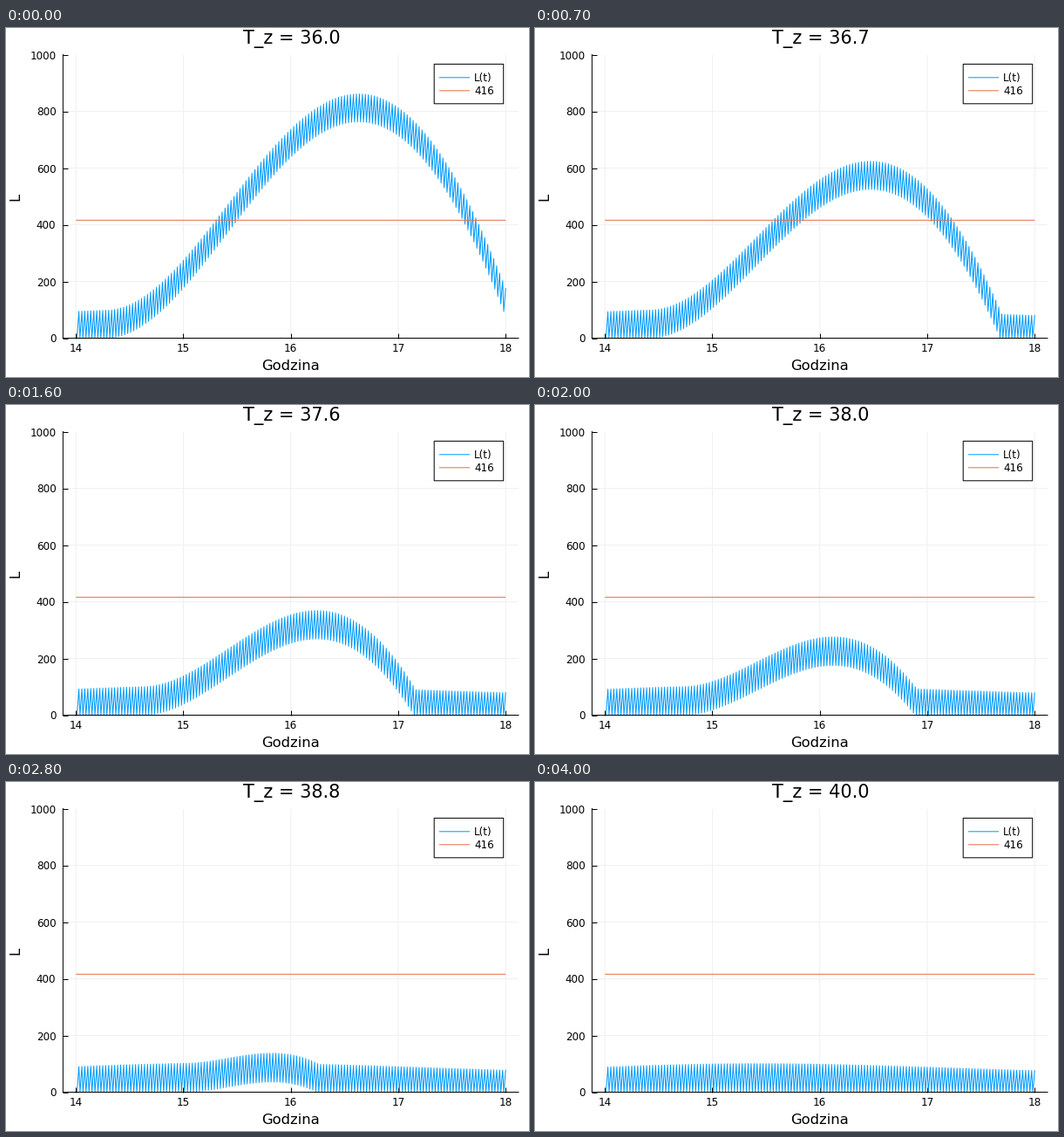
A matplotlib script that plays this animation: 600x400 px, repeating every 4.1 s.

```python
import numpy as np
import matplotlib.pyplot as plt
from matplotlib.animation import FuncAnimation
from matplotlib.patches import Rectangle

W, H, DPI = 600, 400, 100
BLUE, ORANGE = "#009afa", "#e36f47"
CYCLE, HOURS = 100, 4      # light cycle in seconds, length of the simulation
OUTFLOW = 4.2826           # cars per second leaving on green
LIMIT = 416


def pt(px):
    return px * 72 / DPI


def inflow(t):
    """Cars per second arriving at hour t, a slightly skewed rush-hour bell."""
    return 1.015 + 0.665 * np.exp(-40 * np.log(t / 15.41) ** 2)


def queue(green):
    """Queue length at every change of the lights."""
    ts, ls = [14.0], [0.0]
    level = 0.0
    for k in range(HOURS * 3600 // CYCLE):
        start = 14 + k * CYCLE / 3600
        rate = inflow(start + CYCLE / 7200)
        level = max(0.0, level - (OUTFLOW - rate) * green)
        ts.append(start + green / 3600)
        ls.append(level)
        level += rate * (CYCLE - green)
        ts.append(start + CYCLE / 3600)
        ls.append(level)
    return ts, ls


plt.rcParams["font.family"] = "DejaVu Sans"
fig = plt.figure(figsize=(W / DPI, H / DPI), dpi=DPI, facecolor="white")
left, right, top, bottom = 65.4, 588.0, 30.5, 355.5
ax = fig.add_axes([left / W, 1 - bottom / H, (right - left) / W, (bottom - top) / H])
ax.set_xlim(13.88, 18.12)
ax.set_ylim(0, 1000)
ax.set_xticks(range(14, 19))
ax.set_yticks(range(0, 1001, 200))
ax.tick_params(direction="in", length=pt(6), width=pt(1), labelsize=pt(12), pad=pt(5.5))
ax.tick_params(axis="y", pad=pt(8))
ax.grid(color="#f0f0f0", linewidth=pt(1), snap=False)
ax.set_axisbelow(True)
for side in ("top", "right"):
    ax.spines[side].set_visible(False)
for side in ("left", "bottom"):
    ax.spines[side].set_linewidth(pt(1))
    ax.spines[side].set_snap(False)
for tick in ax.xaxis.get_ticklines() + ax.yaxis.get_ticklines():
    tick.set_snap(False)


def label(x, y, text, size, **kw):
    return fig.text(x / W, 1 - y / H, text, fontsize=pt(size), **kw)


title = label(327.5, 18.4, "", 20.9, ha="center", va="baseline")
label(327, 392, "Godzina", 16.4, ha="center", va="baseline")
label(18.7, 193.5, "L", 16.4, ha="right", va="center", rotation=90)

curve, = ax.plot([], [], color=BLUE, lw=pt(1), solid_joinstyle="round")
ax.plot([14, 18], [LIMIT, LIMIT], color=ORANGE, lw=pt(1), snap=False,
        solid_capstyle="butt")

# legend
fig.add_artist(Rectangle((491.2 / W, 1 - 86.8 / H), 79.5 / W, 45.4 / H,
                         fc="white", ec="black", lw=pt(1), snap=False, zorder=5))
for y, color, text in ((56.8, BLUE, "L(t)"), (71.8, ORANGE, str(LIMIT))):
    fig.add_artist(plt.Line2D([497 / W, 532 / W], [1 - y / H] * 2, color=color,
                              lw=pt(1), snap=False, zorder=6, solid_capstyle="butt"))
    label(537, y + 4.6, text, 12, va="baseline", zorder=6)


def draw(i):
    green = 36 + i / 10
    title.set_text(f"T_z = {green:.1f}")
    curve.set_data(*queue(green))
    return curve, title


anim = FuncAnimation(fig, draw, frames=41, interval=100, repeat=True, repeat_delay=0)
plt.show()
```
